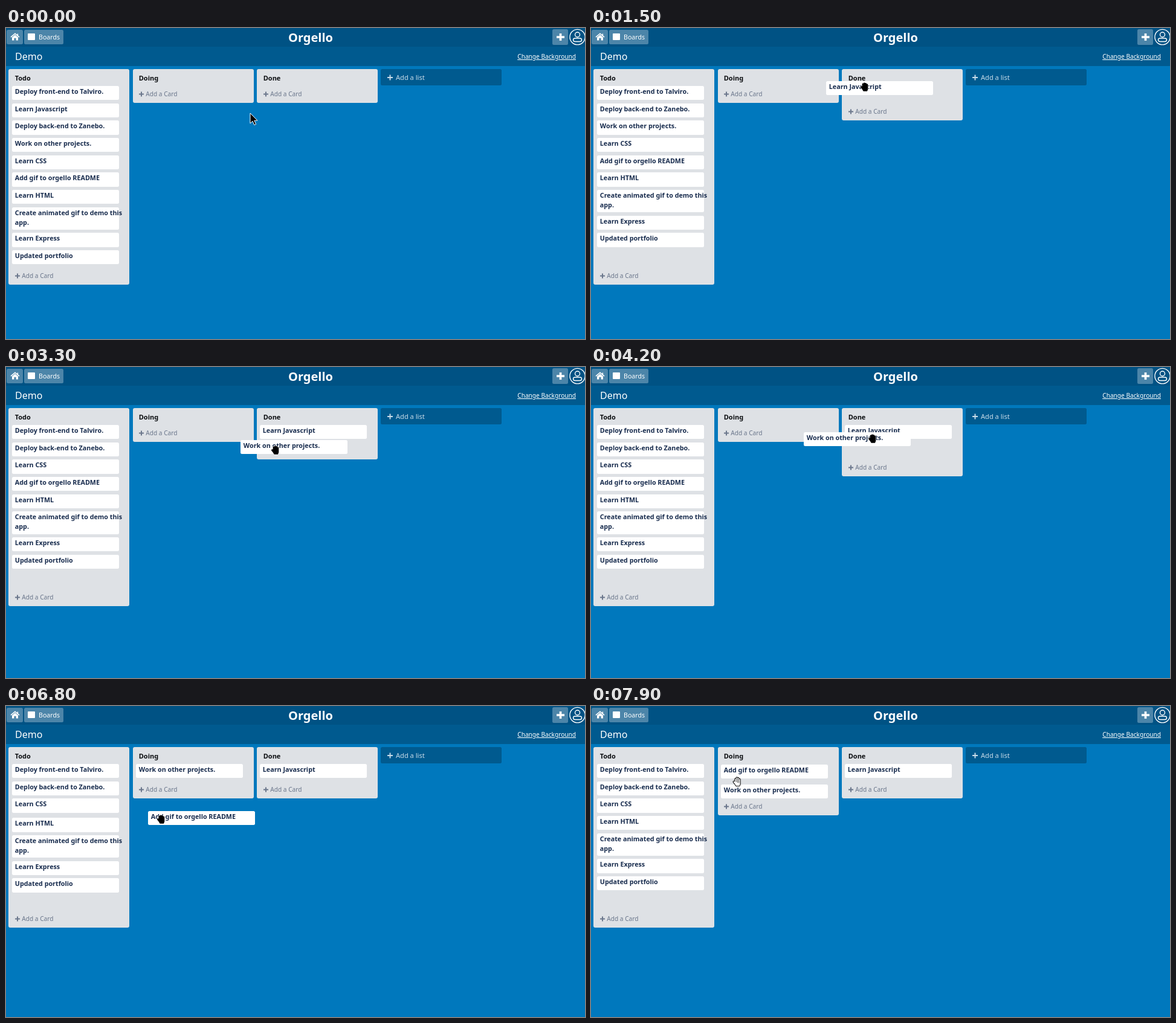
An HTML page that plays this animation: 958x515 px, repeating every 8 s.

```html
<!DOCTYPE html>
<html lang="en">
<head>
<meta charset="utf-8">
<title>Board demo</title>
<style>
  html, body { margin: 0; width: 100%; height: 100%; overflow: hidden; background: #0078bd; }
  svg { display: block; font-family: "Noto Sans", "Open Sans", sans-serif; }
  .card { font-size: 10.75px; font-weight: 600; fill: #172b4d; }
  .title { font-size: 11px; font-weight: 700; fill: #0b0d10; }
  .add { font-size: 10.15px; fill: #6b778c; }
</style>
</head>
<body>
<svg width="958" height="515" viewBox="0 0 958 515">
  <rect width="958" height="515" fill="#0078bd"/>
  <rect width="958" height="63" fill="#005a8f"/>
  <rect width="958" height="31" fill="#005284"/>
  <g fill="#4c85a9">
    <rect x="1" y="3" width="27" height="24" rx="2.5"/>
    <rect x="30" y="3" width="65" height="24" rx="2.5"/>
    <rect x="904" y="2" width="26" height="26" rx="2.5"/>
  </g>
  <g fill="#fff">
    <path d="M10 15.5L15 11.2L20 15.5V20.5H16.6V16.8H13.4V20.5H10Z"/>
    <path d="M8 15.2L15 9.2L22 15.2M19.3 9.5V12.5" fill="none" stroke="#fff" stroke-width="1.6"/>
    <rect x="36" y="9" width="12" height="11" rx="1"/>
    <path d="M911 15h13M917.5 9v12" stroke="#fff" stroke-width="3.6"/>
    <text x="54" y="19" font-size="10.6">Boards</text>
    <text x="504" y="23" font-size="20" font-weight="600" text-anchor="middle">Orgello</text>
    <text x="15" y="53" font-size="16">Demo</text>
    <text x="943" y="51" font-size="10.15" text-anchor="end" text-decoration="underline">Change Background</text>
  </g>
  <g fill="none" stroke="#fff" stroke-width="1.4">
    <circle cx="945.5" cy="15" r="12.6"/>
    <circle cx="945.5" cy="11" r="4"/>
    <rect x="938.5" y="17" width="14" height="5.5" rx="3"/>
  </g>
  <rect x="620" y="68" width="200" height="27" rx="2.5" fill="#005a8f"/>
  <path d="M631 82h9M635.5 77.5v9" stroke="#c8dce9" stroke-width="1.9"/>
  <text x="645" y="86" font-size="11.1" fill="#c8dce9">Add a list</text>
  <g id="board"></g>
  <g id="cursor"></g>
</svg>
<script>
const LOOP = 8000, STEP = 100, LAG = 60, DROP_TIME = 330;
const PITCH = 616 / 3, SLOT = 86 / 3, GAP = 16 / 3, CARD_W = 177, TOP = 96;
const SHIFT = SLOT + GAP;
const TITLES = ["Todo", "Doing", "Done"];
const TODO = [
  "Deploy front-end to Talviro.", "Learn Javascript", "Deploy back-end to Zanebo.",
  "Work on other projects.", "Learn CSS", "Add gif to orgello README", "Learn HTML",
  "Create animated gif to demo this|app.", "Learn Express", "Updated portfolio"
];

// hover: lists that open a slot; push: list whose cards make room
const DRAGS = [
  { text: TODO[1], to: 2, grip: [70, 9], grab: 850, lift: 850, leave: 950, drop: 1780,
    hover: [[2, 1290, Infinity]] },
  { text: TODO[3], to: 1, grip: [58, 10], grab: 2450, lift: 2450, leave: 2549, drop: 5680,
    hover: [[2, 3350, 4250], [1, 4960, Infinity]], push: [2, 3450, 3620] },
  { text: TODO[5], to: 1, grip: [27, 12], grab: 6550, lift: 6650, leave: 6692, drop: 7790,
    hover: [[1, 7430, Infinity]], push: [1, 7460, Infinity] }
];

// pointer path: time, x, y
const PATH = [
  [0, 404, 141], [140, 365, 164], [540, 21, 126], [640, 80, 134],
  [840, 80, 134], [1200, 330, 126], [1300, 425, 80], [1440, 453, 97], [1640, 474, 97],
  [1780, 474, 97], [2240, 68, 164],
  [2440, 68, 164], [2500, 182, 162], [2600, 264, 158], [2900, 446, 170], [3300, 446, 131],
  [3550, 490, 80], [3740, 469, 119], [4140, 466, 118], [4200, 410, 118], [4540, 276, 106],
  [4940, 275, 105], [5340, 270, 93],
  [5680, 270, 93], [5880, 404, 82], [6140, 37, 194],
  [6640, 37, 194], [6740, 257, 187], [6800, 262, 186], [6950, 330, 184], [7340, 256, 136],
  [7560, 242, 125]
];

const ARROW = '<path d="M0 0V17L4 13.2L6.8 19.6L9.6 18.4L6.8 12.2H12Z" fill="#000" stroke="#fff"/>';
function hand(heights, outer, inner, thick, thin) {
  const fingers = heights.map((h, n) => `M${2.3 * n - 3} 4V${-h}`).join("");
  const shape = `${fingers}M-5.6 .6L-3 4L-1.5 6.4H3L3.9 4Z`;
  const layer = (color, width) => `<path d="${shape}" fill="${color}" stroke="${color}"
    stroke-width="${width}" stroke-linecap="round" stroke-linejoin="round"/>`;
  return layer(outer, thick) + layer(inner, thin);
}
const OPEN = hand([4, 6, 5.5, 3.5], "#000", "#fff", 3.6, 1.6);
const FIST = hand([4, 5, 4.5, 3], "#fff", "#000", 4, 2.8);

const board = document.getElementById("board");
const cursor = document.getElementById("cursor");
const mix = (a, b, k) => a + (b - a) * k;
const clamp = v => Math.max(0, Math.min(1, v));
const listX = i => Math.round(4.3 + PITCH * i);
const cardX = i => Math.round(9.67 + PITCH * i);
const pitchOf = text => text.includes("|") ? 128 / 3 : SLOT;

function bezier(x1, y1, x2, y2) {
  const at = (a, b, u) => 3 * a * u * (1 - u) ** 2 + 3 * b * u * u * (1 - u) + u ** 3;
  return x => {
    let lo = 0, hi = 1;
    for (let n = 0; n < 24; n++) {
      const mid = (lo + hi) / 2;
      if (at(x1, x2, mid) < x) lo = mid; else hi = mid;
    }
    return at(y1, y2, lo);
  };
}
const slide = bezier(.2, 0, 0, 1);
const settle = bezier(.2, 1, .1, 1);
const since = (t, start) => slide(clamp((t - start) / 200));
const pulse = (t, on, off) => since(t, on) - since(t, off);

function pointer(t) {
  const next = PATH.findIndex(p => p[0] > t);
  if (next === 0) return PATH[0].slice(1);
  if (next < 0) return PATH[PATH.length - 1].slice(1);
  const a = PATH[next - 1], b = PATH[next], k = (t - a[0]) / (b[0] - a[0]);
  return [mix(a[1], b[1], k), mix(a[2], b[2], k)];
}

function cardMarkup(text, x, y) {
  const top = Math.round(y), bottom = Math.round(y + pitchOf(text) - GAP);
  const left = Math.round(x);
  const lines = text.split("|").map((line, n) =>
    `<text class="card" x="${left + 4.8}" y="${top + 13 + 16 * n}">${line}</text>`).join("");
  return `<rect x="${left}" y="${top}" width="${CARD_W}" height="${bottom - top}" rx="2.5" fill="#fff"/>${lines}`;
}

function listMarkup(i, height) {
  const x = listX(i), tx = Math.round(15 + PITCH * i);
  const bottom = Math.round(68 + height), y = bottom - 15;
  return `<rect x="${x}" y="68" width="200" height="${bottom - 68}" rx="3" fill="#dee1e5"/>
    <text class="title" x="${tx - .3}" y="87">${TITLES[i]}</text>
    <path d="M${tx} ${y + .5}h8M${tx + 4} ${y - 3.5}v8" stroke="#6b778c" stroke-width="2"/>
    <text class="add" x="${tx + 11.3}" y="${y + 4}">Add a Card</text>`;
}

function draw(t) {
  const lists = [TODO.slice(), [], []];
  let active = null, source = -1;
  for (const d of DRAGS) {
    if (t < d.lift) break;
    source = lists[0].indexOf(d.text);
    lists[0].splice(source, 1);
    if (t >= d.drop + DROP_TIME) lists[d.to].unshift(d.text);
    else active = d;
  }

  let markup = "";
  const hits = [];
  lists.forEach((cards, i) => {
    let extra = 0, push = 0;
    if (active) {
      if (i === 0) extra = SLOT;
      for (const [list, on, off] of active.hover) if (list === i) extra += SLOT * pulse(t, on, off);
      if (active.push && active.push[0] === i) push = SHIFT * pulse(t, active.push[1], active.push[2]);
    }
    const stack = cards.reduce((sum, text) => sum + pitchOf(text), 0);
    markup += listMarkup(i, 56 + stack + extra);
    let y = TOP;
    cards.forEach((text, n) => {
      const open = active && i === 0 && n >= source ? SHIFT * (1 - since(t, active.leave)) : 0;
      markup += cardMarkup(text, cardX(i), y + push + open);
      hits.push([cardX(i), y, pitchOf(text) - GAP]);
      y += pitchOf(text);
    });
  });

  if (active) {
    const p = pointer(Math.min(t, active.drop));
    const k = t < active.drop ? 0 : settle(clamp((t - active.drop) / DROP_TIME));
    markup += cardMarkup(active.text,
      mix(p[0] - active.grip[0], cardX(active.to), k),
      mix(p[1] - active.grip[1], TOP, k));
  }
  board.innerHTML = markup;

  const [px, py] = pointer(t - LAG);
  const held = DRAGS.some(d => t >= d.grab && t < d.drop);
  const over = hits.some(([x, y, h]) => px >= x && px <= x + CARD_W && py >= y && py <= y + h);
  cursor.setAttribute("transform", `translate(${Math.round(px)} ${Math.round(py)})`);
  cursor.innerHTML = held ? FIST : over || active ? OPEN : ARROW;
}

const begin = performance.now();
let shown = -1;
function tick() {
  const t = Math.floor((performance.now() - begin) % LOOP / STEP) * STEP;
  if (t !== shown) draw(shown = t);
  requestAnimationFrame(tick);
}
tick();
</script>
</body>
</html>
```
